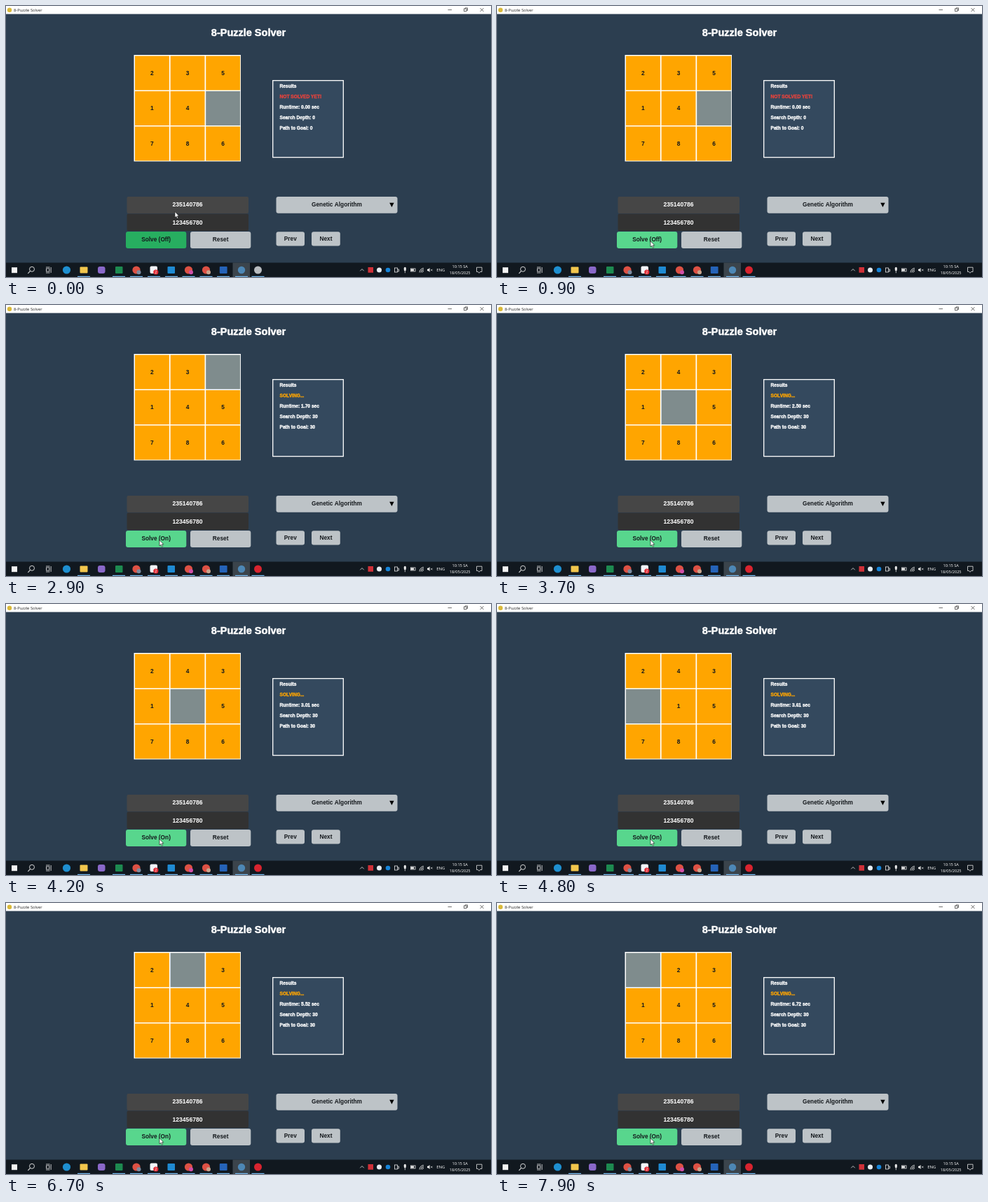
An HTML page with a canvas that plays this animation: 692x388 px, repeating every 8000 ms.

```html
<!DOCTYPE html>
<html lang="en">
<head>
<meta charset="utf-8">
<title>8-Puzzle Solver</title>
<style>
html, body { margin: 0; width: 100%; height: 100%; overflow: hidden; background: #2c3e50; }
canvas { display: block; }
</style>
</head>
<body>
<canvas id="stage" width="692" height="388"></canvas>
<script>
const ctx = document.getElementById('stage').getContext('2d');
const LOOP = 8000, STEP = 100, SOLVE_AT = 1200;
const BOLD = '"Liberation Sans", Arial, sans-serif';
const UI = '"Open Sans", sans-serif';
const INK = '#14181c', LIGHT = '#e8e8e8', GRAY = '#bdc3c7';

// Each move slides the blank: [time, board]
const boards = [
  [0, '235140786'], [1700, '230145786'], [3200, '203145786'], [3700, '243105786'],
  [4700, '243015786'], [5200, '243105786'], [6200, '203145786'], [7200, '023145786']
];

function rect(x, y, w, h, color, r = 0) {
  ctx.fillStyle = color;
  ctx.beginPath();
  ctx.roundRect(x, y, w, h, r);
  ctx.fill();
}

function disc(x, y, r, color) {
  ctx.fillStyle = color;
  ctx.beginPath();
  ctx.arc(x, y, r, 0, 7);
  ctx.fill();
}

function path(points, color, width = 0.8, closed = false) {
  ctx.beginPath();
  points.forEach(([x, y]) => ctx.lineTo(x, y));
  if (closed) ctx.closePath();
  ctx.strokeStyle = color;
  ctx.lineWidth = width;
  ctx.stroke();
}

function ring(x, y, r, color, from = 0, to = 7) {
  ctx.beginPath();
  ctx.arc(x, y, r, from, to);
  ctx.strokeStyle = color;
  ctx.lineWidth = 0.9;
  ctx.stroke();
}

function frame(x, y, w, h, color, width = 0.8) {
  ctx.strokeStyle = color;
  ctx.lineWidth = width;
  ctx.strokeRect(x, y, w, h);
}

function fillShape(points, color) {
  ctx.fillStyle = color;
  ctx.beginPath();
  points.forEach(([x, y]) => ctx.lineTo(x, y));
  ctx.closePath();
  ctx.fill();
}

// Text centred vertically on y; heavy adds a thin outline for extra weight.
function text(s, x, y, size, color, { align = 'center', font = BOLD, weight = 'bold', heavy = 0 } = {}) {
  ctx.font = `${weight} ${size}px ${font}`;
  ctx.textAlign = align;
  ctx.fillStyle = ctx.strokeStyle = color;
  ctx.fillText(s, x, y + size * 0.34);
  if (heavy) {
    ctx.lineWidth = heavy;
    ctx.strokeText(s, x, y + size * 0.34);
  }
}

function button(x, y, w, h, label, color = GRAY) {
  rect(x, y, w, h, color, 3);
  text(label, x + w / 2, y + h / 2 - 0.4, 8.3, INK);
}

function titleBar() {
  rect(0, 0, 692, 11.5, '#fff');
  disc(5, 5.7, 3.2, '#d9b93b');
  text('8-Puzzle Solver', 11, 5.6, 5.8, '#222', { align: 'left', font: UI, weight: 400 });
  path([[630.5, 5.5], [636, 5.5]], '#333', 0.7);
  frame(653.5, 4, 3.6, 3.6, '#333', 0.7);
  path([[655, 4], [655, 2.8], [658.5, 2.8], [658.5, 6.3], [657, 6.3]], '#333', 0.7);
  path([[676.5, 3], [681.5, 8]], '#333', 0.7);
  path([[681.5, 3], [676.5, 8]], '#333', 0.7);
}

function board(cells) {
  rect(182.5, 70, 152.5, 152.5, '#fff');
  [...cells].forEach((n, i) => {
    const x = 184 + 50.6 * (i % 3), y = 71.5 + 50.5 * Math.floor(i / 3);
    rect(x, y, 48.9, 48.9, n === '0' ? '#7f8c8d' : '#ffa500');
    if (n !== '0') text(n, x + 24.4, y + 24.4, 8.4, INK);
  });
}

function results(t) {
  const on = t >= SOLVE_AT;
  const runtime = Math.max(0, 2.5035 + 1.004 * (t - 3700) / 1000);
  const count = on ? 30 : 0;
  rect(380.5, 106.5, 101, 110, '#34495e');
  frame(380.7, 106.7, 100.6, 110, '#fff', 1.3);
  [
    'Results',
    on ? 'SOLVING...' : 'NOT SOLVED YET!',
    `Runtime: ${runtime.toFixed(2)} sec`,
    `Search Depth: ${count}`,
    `Path to Goal: ${count}`
  ].forEach((line, i) => {
    const color = i !== 1 ? '#fff' : on ? '#ffa500' : '#e8433c';
    text(line, 390.5, 114.6 + 15.1 * i, 6.65, color, { align: 'left', heavy: 0.35 });
  });
}

function controls(t, hover) {
  rect(172.5, 273, 173.5, 24, '#464646', 2);
  rect(172.5, 297.5, 173.5, 24.5, '#323232', 2);
  text('235140786', 259, 284.4, 8.6, '#fff');
  text('123456780', 259, 309.6, 8.6, '#fff');
  button(171, 323, 86.3, 24, `Solve (${t >= SOLVE_AT ? 'On' : 'Off'})`, hover ? '#58d68d' : '#27ae60');
  button(263, 323, 86.3, 24, 'Reset');
  button(385.5, 273, 173, 23.7, 'Genetic Algorithm');
  fillShape([[547.2, 281.8], [553.6, 281.8], [550.4, 288]], '#000');
  button(385.5, 323.3, 40.5, 20.3, 'Prev');
  button(436, 323.3, 40.8, 20.3, 'Next');
}

function taskbar(recording) {
  rect(0, 367.5, 692, 20.5, '#11181f');
  rect(323.5, 367.5, 24.5, 20.5, '#3b444c');
  rect(8, 374.2, 8, 8, '#f4f4f4');
  ring(37, 376.8, 3.5, LIGHT);
  path([[34.6, 379.4], [31.3, 383]], LIGHT, 1.1);
  frame(57.5, 376, 4.5, 4, LIGHT);
  path([[57, 374], [62.5, 374]], LIGHT);
  path([[57, 382], [62.5, 382]], LIGHT);
  path([[64.2, 374], [64.2, 382]], LIGHT);

  disc(86.5, 378, 5.6, '#1e8fd0');
  rect(105.5, 373.5, 11, 9, '#f2c64c', 1);
  rect(131, 373, 10.5, 10, '#8a68c9', 3);
  rect(156, 373, 10.5, 10, '#1d8a50', 1);
  for (const [x, badge] of [[186, '#7c8ba0'], [260.5, '#d04fa8'], [285.5, '#c9a58e']]) {
    disc(x, 378, 5.6, '#dd5144');
    disc(x + 3.5, 381.2, 3, badge);
  }
  rect(205.5, 372.5, 10.5, 10.5, '#f2f4f8', 2);
  disc(213.8, 381, 3.6, '#e02b35');
  text('2', 213.8, 381, 5.5, '#fff', { font: UI, weight: 400 });
  rect(230.5, 373, 10.5, 10, '#1f8ad2', 1);
  rect(304.8, 373, 10.8, 10, '#2563b8', 1);
  disc(336, 378, 5.2, '#4d87b5');
  disc(359.5, 378, 5.5, recording ? '#d8242f' : '#b8bcc0');
  for (const x of [111, 161, 186, 211, 236, 260.5, 285.5, 310, 336, 359.5]) {
    rect(x - 9, 386.8, 18, 1.2, '#76b9ed');
  }

  path([[505.3, 379.3], [508, 376.6], [510.7, 379.3]], LIGHT);
  rect(516.5, 374, 7.5, 7.8, '#cf3038');
  disc(532.5, 378, 3.5, '#e8eef4');
  disc(545, 378, 3.3, '#1685da');
  frame(554.5, 375, 4, 6, LIGHT);
  path([[558.5, 377], [560.5, 377], [560.5, 380], [558.5, 380]], LIGHT);
  rect(567.8, 373.8, 3, 5.5, LIGHT, 1.5);
  path([[569.3, 379], [569.3, 382.3]], LIGHT);
  frame(577.5, 376, 6.5, 4, LIGHT);
  rect(578, 376.5, 4, 3, LIGHT);
  for (const r of [2, 4, 6]) ring(596, 381.5, r, LIGHT, Math.PI, Math.PI * 1.5);
  fillShape([[601, 376.8], [602.5, 376.8], [604.5, 375], [604.5, 381], [602.5, 379.2], [601, 379.2]], LIGHT);
  path([[606, 376.8], [608.5, 379.3]], LIGHT, 0.7);
  path([[608.5, 376.8], [606, 379.3]], LIGHT, 0.7);
  const small = { font: UI, weight: 400 };
  text('ENG', 620.3, 378, 6, '#fff', small);
  text('10:15 SA', 647.7, 373.2, 5.6, '#fff', small);
  text('18/05/2025', 647.7, 382, 5.6, '#fff', small);
  path([[671.5, 374.2], [679, 374.2], [679, 380.5], [676.5, 380.5], [675, 382.3], [673.5, 380.5], [671.5, 380.5]],
    LIGHT, 0.8, true);
}

function cursor(x, y) {
  const shape = [[0, 0], [0, 8.4], [1.9, 6.7], [3.2, 9.7], [4.6, 9.1], [3.3, 6.2], [5.9, 6.2]]
    .map(([dx, dy]) => [x + dx, y + dy]);
  fillShape(shape, '#fff');
  path(shape, '#111', 0.6, true);
}

function draw(now) {
  const t = Math.floor(now % LOOP / STEP) * STEP;
  const p = Math.min(1, t / 700), ease = p * p * (3 - 2 * p);
  const x = 241 - 22 * ease, y = 294.5 + 42 * ease;
  rect(0, 0, 692, 388, '#2c3e50');
  titleBar();
  text('8-Puzzle Solver', 346, 38, 14.5, '#fff', { heavy: 0.5 });
  board(boards.filter(b => b[0] <= t).pop()[1]);
  results(t);
  controls(t, y >= 323);
  taskbar(t >= 500);
  cursor(x, y);
}

const start = performance.now();
function tick() {
  draw(performance.now() - start);
  requestAnimationFrame(tick);
}
tick();
</script>
</body>
</html>
```
